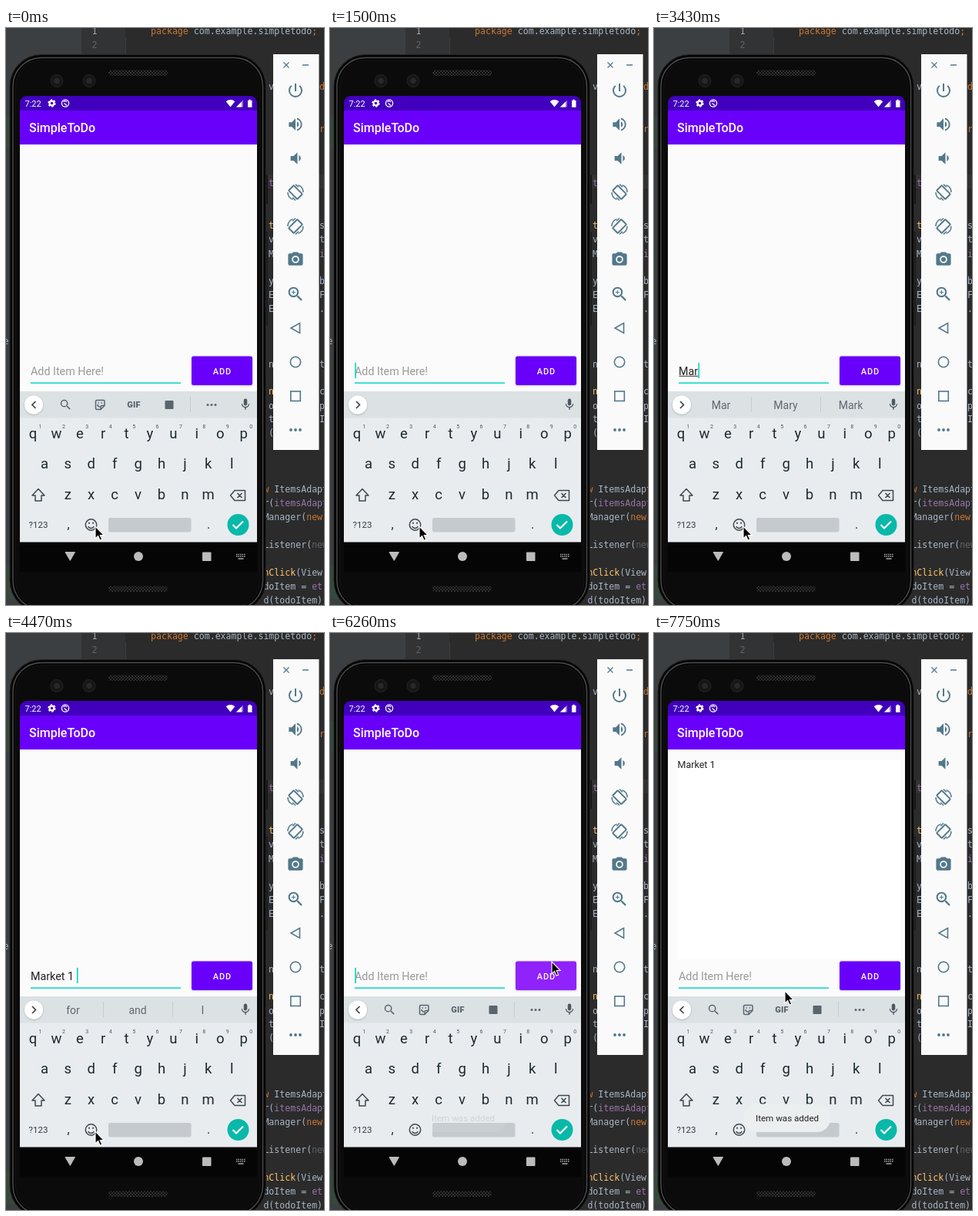
An HTML page for the animation above (8000 ms loop, 413 by 748 pixels).

```html
<!DOCTYPE html>
<html lang="en">
<head>
<meta charset="utf-8">
<title>To-do app demo</title>
<style>
html, body { margin: 0; width: 100%; height: 100%; overflow: hidden; background: #2b2b2b; }
svg { display: block; width: 413px; height: 748px; }
text { font-family: Roboto, sans-serif; white-space: pre; }
.code { font-family: "DejaVu Sans Mono", monospace; font-size: 11.58px; }
.mid { text-anchor: middle; }
.line { fill: none; stroke: currentColor; }
.key { font-size: 18.5px; fill: #1d2930; text-anchor: middle; }
.num { font-size: 7px; fill: #4c5860; text-anchor: middle; }
.sug { font-size: 14px; fill: #60696f; text-anchor: middle; }
</style>
</head>
<body>
<svg viewBox="0 0 413 748">
  <defs>
    <pattern id="mesh" width="4" height="4" patternUnits="userSpaceOnUse">
      <rect width="4" height="4" fill="#0b0b0b"/>
      <path d="M0 0L4 4M4 0L0 4" stroke="#343434" stroke-width=".9"/>
    </pattern>
    <filter id="soft" x="-20%" y="-30%" width="140%" height="170%">
      <feDropShadow dx="0" dy=".8" stdDeviation=".9" flood-opacity=".25"/>
    </filter>
  </defs>

  <rect width="413" height="748" fill="#2b2b2b"/>
  <rect width="98" height="748" fill="#3c3f41"/>
  <rect x="98" width="57" height="60" fill="#313335"/>
  <path d="M155.5 12V40" stroke="#3b3d3f"/>
  <rect y="115" width="5" height="40" fill="#36483c"/>
  <rect y="697" width="20" height="43" fill="#36483c"/>
  <rect x="338" y="190" width="75" height="18" fill="#323232"/>
  <g id="code"></g>

  <!-- phone body -->
  <rect x="336" y="190" width="4" height="38" rx="1.5" fill="#161616"/>
  <rect x="336" y="264" width="4" height="122" rx="1.5" fill="#1d1d1d"/>
  <rect x="5" y="34.500" width="332.500" height="723" rx="41" fill="#050505" stroke="#262626"/>
  <rect x="9" y="38.500" width="324.500" height="715" rx="37" fill="none" stroke="#4a4a4a" stroke-width="1.500"/>
  <rect x="12.500" y="42" width="317.500" height="708" rx="33" fill="#0b0b0b" stroke="#151515"/>
  <rect x="133" y="54.5" width="77" height="7.5" rx="3.5" fill="url(#mesh)"/>
  <rect x="133" y="723.5" width="77" height="7.5" rx="3.5" fill="url(#mesh)"/>
  <g fill="#161616" stroke="#252525">
    <circle cx="66" cy="68.500" r="8"/><circle cx="108" cy="68.500" r="8"/>
    <circle cx="66" cy="68.500" r="3.500" fill="#292929"/><circle cx="108" cy="68.500" r="3.500" fill="#292929"/>
  </g>

  <!-- app -->
  <rect x="18" y="88" width="308" height="40" rx="9" fill="#4100bd"/>
  <rect x="18" y="107" width="308" height="44" fill="#6900fa"/>
  <rect x="18" y="151" width="308" height="320" fill="#fbfbfb"/>
  <g fill="#fff">
    <text x="24.5" y="101.500" font-size="11">7:22</text>
    <text x="30" y="135" font-size="16" font-weight="500">SimpleToDo</text>
    <circle cx="59.500" cy="97.500" r="2.900" fill="none" stroke="#fff" stroke-width="2.200"/>
    <circle cx="59.500" cy="97.500" r="4.400" fill="none" stroke="#fff" stroke-width="1.600" stroke-dasharray="2.3 2.3"/>
    <g fill="none" stroke="#fff" stroke-width="1.300">
      <circle cx="77" cy="97.500" r="4.600"/><path d="M74.500 96a2.500 2.500 0 014.500 0M75.500 97.500l3.500 3"/>
    </g>
    <path d="M291.500 102.500l-5.800-7.200a8.800 8.800 0 0111.600 0z"/>
    <path d="M308 93.500v9h-9z" fill-opacity=".45"/><path d="M306 95.500v7h-7z"/>
    <path d="M314 94h1.300v-1.200h2.400V94h1.800v8.800H314z"/>
  </g>
  <g id="item">
    <rect x="31" y="165" width="290" height="258" fill="#fff"/>
    <text x="30.500" y="174.500" font-size="12.5" fill="#222">Market 1</text>
  </g>

  <rect x="32" y="459.300" width="195" height="1.800" fill="#27dacb"/>
  <text id="hint" x="32" y="449.500" font-size="14.3" fill="#999">Add Item Here!</text>
  <text id="field" x="32" y="449.500" font-size="14.3" fill="#222"></text>
  <rect id="under" x="32.500" y="450.800" height="1" fill="#333"/>
  <rect id="caret" y="434" width="1.700" height="20" fill="#13d5c5"/>
  <rect id="btn" x="241" y="425.500" width="79" height="37.500" rx="2.500" filter="url(#soft)"/>
  <text class="mid" x="281" y="448.500" font-size="11" font-weight="500" letter-spacing=".9" fill="#fff">ADD</text>

  <!-- keyboard -->
  <rect x="18" y="471" width="308" height="196" fill="#e8ecef"/>
  <rect x="18" y="471" width="308" height="34.500" fill="#dce1e4"/>
  <circle cx="36" cy="488.500" r="12" fill="#fff" filter="url(#soft)"/>
  <path id="chev" fill="none" stroke="#3a444a" stroke-width="1.700"/>
  <g id="tools" color="#58656e">
    <g id="search"></g>
    <g class="line" stroke-width="1.500">
      <path d="M118 482.500h8.500q1.500 0 1.500 1.500v5.500l-5 5h-5q-1.500 0-1.500-1.500v-9q0-1.500 1.500-1.500zM128 489.500h-3.500q-1.500 0-1.500 1.500v3.500M119 488a3 3 0 003 3"/>
    </g>
    <path d="M119.500 485.200h1.500v1.500h-1.500zm4 0h1.500v1.500h-1.500z" fill="currentColor"/>
    <text class="mid" x="166" y="492.300" font-size="11" font-weight="900" fill="#58656e" letter-spacing=".3">GIF</text>
    <rect x="206.500" y="483" width="11" height="11" rx="1" fill="#58656e"/>
    <path d="M239.500 478v20" stroke="#c6cdd1"/>
    <g fill="currentColor"><circle cx="262" cy="488.500" r="1.500"/><circle cx="267" cy="488.500" r="1.500"/><circle cx="272" cy="488.500" r="1.500"/></g>
  </g>
  <g id="bar">
    <path d="M126.500 478v20M216.500 478v20" stroke="#c6cdd1"/>
    <text class="sug" x="87" y="493.500"></text><text class="sug" x="171" y="493.500"></text><text class="sug" x="255.500" y="493.500"></text>
  </g>
  <g id="mic"></g>
  <g id="keys"></g>
  <g color="#3c474d" class="line" stroke-width="1.500" stroke-linejoin="round">
    <path id="shift" d="M42 597.500l8 8.500h-4v7h-8v-7h-4z"/>
    <path d="M297 599.500h13.500v13h-13.500l-5.500-6.500zM300.500 603l6 6M306.500 603l-6 6"/>
    <circle cx="110.500" cy="644" r="7.200"/><path d="M106.800 646a4 4 0 007.400 0" stroke-width="1.400"/>
    <path d="M108 640.800v2M113 640.800v2" stroke-width="1.800"/>
  </g>
  <text class="mid" x="42" y="648" font-size="11.5" fill="#303b42">?123</text>
  <text class="key" x="81" y="649" style="font-size:16px">,</text>
  <text class="key" x="263" y="649" style="font-size:16px">.</text>
  <rect x="133" y="635" width="107.500" height="18.500" rx="2.500" fill="#c4cacd"/>
  <circle cx="301.500" cy="644" r="14" fill="#08b9aa"/>
  <path d="M294.500 644l4.500 4.500 9-9" fill="none" stroke="#fff" stroke-width="2.200"/>

  <g id="toast">
    <rect x="117" y="610.500" width="112" height="36.500" rx="17" fill="#eceff0"/>
    <text x="132" y="633" font-size="11.6" fill="#222">Item was added</text>
  </g>

  <!-- navigation -->
  <rect x="18" y="666.500" width="308" height="38" rx="0" fill="#050505"/>
  <g fill="#bcbcbc">
    <path d="M77 679.500h12.500l-6.200 10.800z" stroke="#bcbcbc" stroke-linejoin="round"/>
    <circle cx="172" cy="685" r="6"/><rect x="255" y="679.500" width="11.500" height="11.500" rx=".8"/>
    <path d="M299 682.500h12M299 685h12" stroke="#aaa" stroke-width="1.500" stroke-dasharray="1.5 1"/>
    <path d="M301.500 688h7" stroke="#aaa" stroke-width="1.500"/>
  </g>

  <!-- emulator controls -->
  <rect x="347" y="34" width="59.500" height="513" fill="#fafafa"/>
  <g id="side" color="#52788a">
    <path class="line" stroke-width="1.300" d="M360.500 44.500l7 7M367.500 44.500l-7 7M385 48h8"/>
    <g id="turnL" class="line"></g>
    <g id="turnR" class="line"></g>
    <g class="line" stroke-width="1.600">
      <path d="M381.500 382.500v13l-11.500-6.500z"/><circle cx="376" cy="433" r="6.700"/><rect x="369.800" y="471" width="12.500" height="12.500"/>
    </g>
    <g fill="currentColor"><circle cx="370" cy="521" r="1.900"/><circle cx="376" cy="521" r="1.900"/><circle cx="382" cy="521" r="1.900"/></g>
  </g>

  <path id="mouse" d="M0 0V15.800L3.600 12.500 6.100 18.200 8.700 17.100 6.200 11.500H11.200Z" fill="#000" stroke="#fff" stroke-width="1.100"/>
</svg>
<script>
const $ = id => document.getElementById(id);
const NS = 'http://www.w3.org/2000/svg';

function add(parent, tag, attrs, text) {
  const el = document.createElementNS(NS, tag);
  for (const k in attrs) el.setAttribute(k, attrs[k]);
  if (text) el.textContent = text;
  return parent.appendChild(el);
}

// 24-unit glyphs, centred on x,y
function icon(parent, x, y, size, d, fill = 'currentColor') {
  const s = size / 24;
  add(parent, 'path', { d, fill, 'fill-rule': 'evenodd', transform: `translate(${x - size / 2} ${y - size / 2}) scale(${s})` });
}
const LENS = 'M15.5 14h-.79l-.28-.27A6.47 6.47 0 0016 9.5 6.5 6.5 0 109.5 16c1.61 0 3.09-.59 4.23-1.57l.27.28v.79l5 4.99L20.49 19l-4.99-5zm-6 0a4.5 4.5 0 110-9 4.5 4.5 0 010 9z';
icon($('search'), 77.5, 488.5, 18, LENS);
icon($('mic'), 311, 488, 18, 'M12 14c1.66 0 3-1.34 3-3V5a3 3 0 00-6 0v6c0 1.66 1.34 3 3 3zm5.3-3c0 3-2.54 5.1-5.3 5.1S6.7 14 6.7 11H5c0 3.41 2.72 6.23 6 6.72V21h2v-3.28c3.28-.48 6-3.3 6-6.72h-1.7z', '#4d5960');
const side = $('side');
icon(side, 376, 81, 24, 'M13 3h-2v10h2V3zm4.83 2.17l-1.42 1.42A6.92 6.92 0 0119 12c0 3.87-3.13 7-7 7s-7-3.13-7-7c0-2.17 1-4.13 2.58-5.42L6.17 5.17A8.96 8.96 0 003 12a9 9 0 1018 0c0-2.74-1.23-5.18-3.17-6.83z');
icon(side, 376, 125, 23, 'M3 9v6h4l5 5V4L7 9H3zm13.5 3A4.5 4.5 0 0014 7.97v8.05A4.47 4.47 0 0016.500 12zM14 3.23v2.06a7 7 0 010 13.42v2.06a9 9 0 000-17.54z');
icon(side, 376.5, 169, 23.5, 'M5 9v6h4l5 5V4L9 9H5zm13.5 3A4.5 4.5 0 0016 7.97v8.05A4.47 4.47 0 0018.500 12z');
icon(side, 376, 300, 23, 'M9 2L7.17 4H4c-1.1 0-2 .9-2 2v12c0 1.1.9 2 2 2h16c1.1 0 2-.9 2-2V6c0-1.1-.9-2-2-2h-3.17L15 2H9zm3 15a5 5 0 110-10 5 5 0 010 10zm0-1.800a3.200 3.200 0 100-6.400 3.200 3.200 0 000 6.400z');
icon(side, 376, 345, 25, LENS + 'M12 10h-2v2H9v-2H7V9h2V7h1v2h2v1z');

// tilted device with an arrow at two opposite corners; flip mirrors it
function turnIcon(g, y, flip) {
  g.setAttribute('transform', `translate(376 ${y}) scale(${flip} 1)`);
  add(g, 'rect', { x: -4.7, y: -8, width: 9.4, height: 16, rx: 1, transform: 'rotate(-45)', 'stroke-width': 1.9 });
  for (const turn of [0, 180]) {
    add(g, 'path', { d: 'M10 0A10 10 0 003.5-9.400M0-10.500l3.800 3.800', transform: `rotate(${turn})`, 'stroke-width': 1.5 });
  }
}
turnIcon($('turnL'), 213, 1);
turnIcon($('turnR'), 257, -1);

// editor text: [x, y, text, colour, text, colour, ...]
const OR = '#cc7832', GR = '#a9b7c6', YE = '#ffc66d', PU = '#9876aa', DIM = '#606366';
const edge = 334.4, thin = 341, far = 407;
[
  [111.5, 8, '1', '#a4a3a3'], [111.5, 26, '2', DIM],
  [188, 8, 'package ', OR, 'com.example.simpletodo', GR, ';', OR],
  [thin, 80, 'vi', GR], [far, 80, 'd', OR], [far, 135, 'r', OR], [thin, 205, 't', PU],
  [thin, 260, 'te', YE], [far, 260, 's', GR], [thin, 278, 've', GR], [far, 278, 't', GR],
  [thin, 297, 'Ma', GR], [far, 297, 'i', PU], [thin, 332, 'y', GR], [far, 332, 'b', GR],
  [thin, 350, 'E', GR], [far, 350, 'F', GR], [thin, 368, 'E', GR], [far, 368, '.', GR],
  [thin, 440, 'ng', GR], [far, 440, 't', GR], [thin, 475, 'nI', YE], [far, 475, 'c', GR],
  [thin, 494, 'ov', GR], [far, 494, 'p', GR], [thin, 511, 'te', GR], [far, 511, 'I', GR],
  [thin, 529, '()', GR], [-3.5, 410, 'e', GR],
  [edge, 602, 'w ', OR, 'ItemsAdapter', GR], [edge, 620, 'r(', GR, 'itemsAdapter', PU],
  [edge, 638, 'Manager(', GR, 'new', OR], [edge, 674, 'Listener(', GR, 'new', DIM],
  [edge, 710, 'nClick', YE, '(View', GR], [edge, 728, 'doItem = ', GR, 'et', PU],
  [edge, 746, 'd(todoItem)', GR]
].forEach(([x, y, ...runs]) => {
  const t = add($('code'), 'text', { x, y, class: 'code' });
  for (let i = 0; i < runs.length; i += 2) add(t, 'tspan', { fill: runs[i + 1] }, runs[i]);
});

const letters = [];
[['qwertyuiop', 35, 532], ['asdfghjkl', 50, 571], ['zxcvbnm', 80.3, 611]].forEach(([row, x0, y], r) => {
  [...row].forEach((ch, i) => {
    const x = x0 + i * 30.4;
    letters.push([add($('keys'), 'text', { x, y, class: 'key' }, ch), ch]);
    if (!r) add($('keys'), 'text', { x: x + 9.5, y: 519, class: 'num' }, String((i + 1) % 10));
  });
});

// each step overrides part of the state from its time on; words: null shows the tool icons
const BASE = '#6900fa';
const steps = [
  [0, { text: '', words: null, caret: 0, caps: 0, at: [116, 646], btn: BASE, item: 0, toast: 0 }],
  [300, { caret: 1 }],
  [600, { text: 'm', words: ['m', 'my', 'me'] }],
  [750, { text: 'ma', words: ['ma', 'may', 'make'] }],
  [1200, { text: 'm', words: ['m', 'my', 'me'] }],
  [1340, { text: '', words: [] }],
  [1940, { caret: 0 }],
  [2380, { caret: 1 }],
  [2980, { caps: 1, caret: 0 }],
  [3130, { caps: 0, caret: 1, text: 'M', words: ['M', 'My', 'Me'] }],
  [3280, { text: 'Ma', words: ['Ma', 'May', 'Make'] }],
  [3430, { text: 'Mar', words: ['Mar', 'Mary', 'Mark'] }],
  [3570, { text: 'Mark', words: ['Mark', 'Market', 'Marks'] }],
  [3720, { text: 'Marke', words: ['Marke', 'Market', 'Marked'] }],
  [3870, { text: 'Market', words: ['Market', 'Markets', 'Marker'] }],
  [4020, { text: 'Market ', words: ['and', 'place', 'value'] }],
  [4320, { text: 'Market 1', words: [] }],
  [4470, { text: 'Market 1 ', words: ['for', 'and', 'I'] }],
  [4770, { words: null, at: [117, 650] }],
  [4920, { caret: 0, at: [126, 654] }],
  [5070, { at: [185, 632] }],
  [5220, { at: [246, 588] }],
  [5370, { at: [273, 542] }],
  [5520, { caret: 1, at: [286, 488] }],
  [5670, { at: [293, 448] }],
  [5810, { at: [293, 435] }],
  [5960, { at: [288, 426], btn: '#7b12fa' }],
  [6110, { text: '', btn: '#8a20fa' }],
  [6260, { btn: '#9024fb', toast: .12 }],
  [6410, { btn: '#7d12fa', toast: .8, item: .4 }],
  [6560, { btn: BASE, toast: 1, item: 1 }],
  [6710, { caret: 0, at: [262, 414] }],
  [6860, { at: [222, 407] }],
  [7160, { caret: 1, at: [196, 452] }],
  [7310, { at: [178, 498] }],
  [7450, { at: [168, 484] }],
  [7600, { caret: 0, at: [169, 470] }],
  [7750, { at: [170, 464] }]
];

const show = (id, on) => { $(id).style.opacity = +on; };
const words = document.querySelectorAll('.sug');

function draw(s) {
  const field = $('field');
  field.textContent = s.text;
  const width = s.text ? field.getComputedTextLength() : 0;
  show('hint', !s.text);
  $('under').setAttribute('width', width);
  show('under', Boolean(s.words && s.words.length && s.text && !s.text.endsWith(' ')));
  $('caret').setAttribute('x', 32.3 + width);
  show('caret', s.caret);
  show('item', s.item);
  show('toast', s.toast);
  show('tools', !s.words);
  show('bar', Boolean(s.words && s.words.length));
  words.forEach((el, i) => { el.textContent = s.words && s.words[i] || ''; });
  $('chev').setAttribute('d', s.words ? 'M34 484l4.500 4.500-4.500 4.500' : 'M38.500 484l-4.500 4.500 4.500 4.500');
  $('btn').setAttribute('fill', s.btn);
  $('shift').setAttribute('fill', s.caps ? '#3c474d' : 'none');
  letters.forEach(([el, ch]) => { el.textContent = s.caps ? ch.toUpperCase() : ch; });
  $('mouse').setAttribute('transform', `translate(${s.at})`);
}

const start = performance.now();
let last = -1;
function tick() {
  const t = (performance.now() - start) % 8000;
  const count = steps.filter(([at]) => at <= t).length;
  if (count !== last) {
    draw(Object.assign({}, ...steps.slice(0, count).map(step => step[1])));
    last = count;
  }
  requestAnimationFrame(tick);
}
tick();
</script>
</body>
</html>
```
